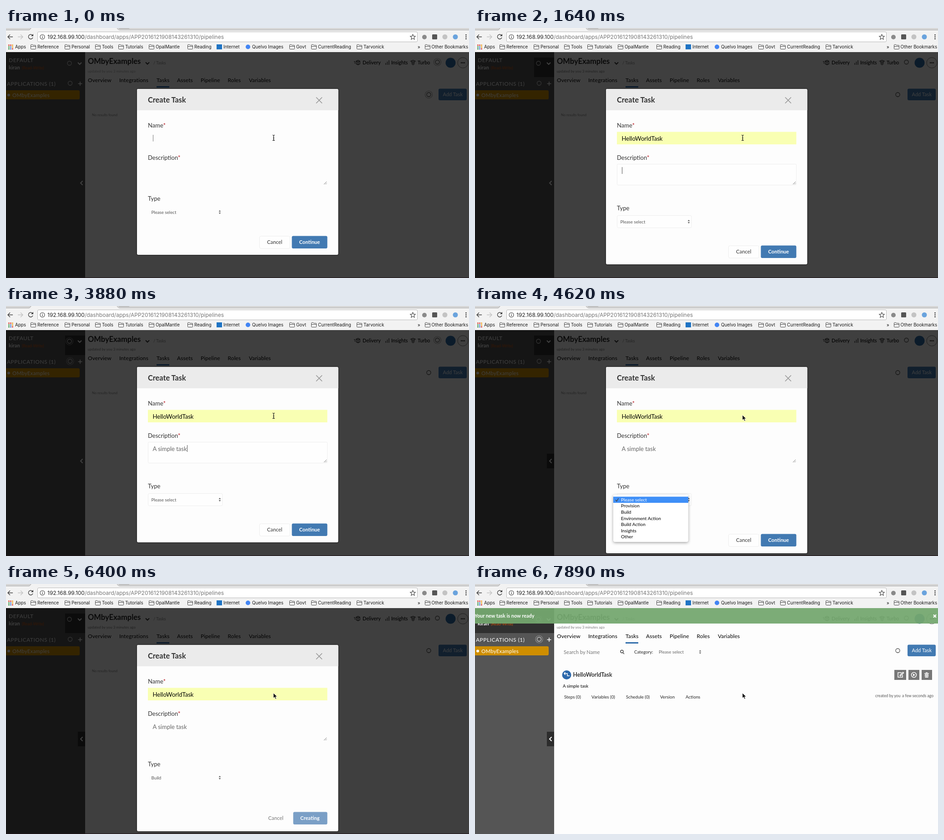
Write an HTML page that moves like this. It is 1018 px wide and 550 px high and loops after 8000 ms.

```html
<!DOCTYPE html>
<html lang="en">
<head>
<meta charset="utf-8">
<title>Create Task</title>
<style>
html, body { margin: 0; width: 100%; height: 100%; overflow: hidden; background: #fdfdfd; }
svg { display: block; width: 100%; height: 100%; }
text { font-family: Lato, "Open Sans", sans-serif; white-space: pre; }
.ui text { font-family: Inter, Roboto, sans-serif; font-size: 9.8px; fill: #1a1a1a; }
.ui .url { font-size: 12px; fill: #777; }
.line { fill: none; stroke: #444; stroke-width: 1.4; }
.b { font-weight: 700; }
.tabs text { font-size: 12px; letter-spacing: .1px; }
.nav text { font-size: 10.8px; font-weight: 500; }
.side text { fill: #fff; }
.side .caps { font-size: 12px; letter-spacing: .5px; }
.small text { font-size: 9.75px; fill: #222; }
.form text { font-size: 13px; fill: #333; }
.form .sel, .form .err { font-size: 9.75px; fill: #555; }
.form .err { fill: #a3141c; }
.form .btn { font-size: 11.3px; }
.form .go { font-size: 11.2px; font-weight: 700; fill: #fff; }
.form .star { fill: #b5121b; }
.box { fill: #fefefe; stroke: #eee; }
.popup text { font-size: 10.1px; fill: #000; }
.w { fill: none; stroke: #fff; stroke-width: 1.5; }
</style>
</head>
<body>
<svg viewBox="0 0 1018 550" preserveAspectRatio="none">
<defs>
  <g id="folder" fill="none" stroke="#4a4a4a"><path d="M.5 9.5v-8q0-1 1-1h3l1.500 1.500h4.500q1 0 1 1v6.500q0 1-1 1h-9q-1 0-1-1zM.5 4.500h11"/></g>
  <path id="updown" d="M-2.300-1h4.600L0-4.200zM-2.300 1h4.600L0 4.200z" fill="#666"/>
  <path id="chev" d="M-4-2L0 2L4-2" fill="none" stroke-width="2.2"/>
</defs>

<!-- page -->
<rect y="53" width="1018" height="497" fill="#fdfdfd"/>
<text x="180" y="79" class="b" font-size="16.5" fill="#222">OMbyExamples</text>
<use href="#chev" x="311" y="77.500" stroke="#333"/>
<text x="324" y="79.500" font-size="9.1" fill="#888">/ Tasks</text>
<text x="179.500" y="97.500" font-size="8" fill="#777" id="updated">updated by you 3 minutes ago</text>
<g class="tabs">
  <text x="180" y="119">Overview</text><text x="249" y="119">Integrations</text>
  <text x="331" y="119">Tasks</text><text x="376" y="119">Assets</text>
  <text x="428" y="119">Pipeline</text><text x="487.500" y="119">Roles</text>
  <text x="534" y="119">Variables</text>
  <rect x="331" y="128" width="28" height="3" fill="#2e6caa"/>
</g>
<g class="nav">
  <path class="line" d="M770 73l4-2l4 2v6l-4 2l-4-2zM770 73l4 2l4-2M774 75v6M765 74h3M766 77h2"/>
  <text x="784" y="80">Delivery</text>
  <path d="M835 81v-4M838.500 81v-7M842 81v-10" class="line" stroke-width="2"/>
  <text x="847" y="80">Insights</text>
  <path class="line" d="M890 73l5-2l5 2l-5 2zM891 76l4 2l4-2M892 79l3 2l3-2"/>
  <text x="905" y="80">Turbo</text>
  <circle cx="977.500" cy="76.500" r="11" fill="#2d6ba6"/>
  <circle cx="1004.500" cy="76.500" r="11.500" fill="none" stroke="#777"/>
  <path d="M1000 76.500h9" stroke="#333" stroke-width="2.400" stroke-dasharray="2.400 1"/>
</g>
<rect x="951" y="133.500" width="62" height="25.500" rx="3" fill="#427ab2"/>
<text x="960.500" y="150" font-size="11.1" fill="#fff">Add Task</text>
<g id="mainSpin"></g>
<text x="189" y="193.500" font-size="7.7" fill="#888" data-on="0 7890">No results found</text>

<g class="small" data-on="7890 8000">
  <text x="195" y="154" style="font-size:11.2px;fill:#777">Search by Name</text>
  <circle class="line" cx="323" cy="148.500" r="3"/><path class="line" d="M325 151l3 3"/>
  <text x="350" y="153">Category:</text>
  <text x="404" y="153" style="fill:#666">Please select</text>
  <use href="#updown" x="495" y="149.500"/>
  <circle cx="201.500" cy="200" r="10" fill="#2c68ab"/>
  <path class="w" stroke-width="2" d="M198.500 194l-2.500 3l2.500 3M196 197h7v5h5"/>
  <text x="215.500" y="203.700" class="b" style="font-size:12.25px;fill:#333">HelloWorldTask</text>
  <text x="193" y="228" style="fill:#000">A simple task</text>
  <text x="196" y="251.500">Steps (0)</text><text x="256" y="251.500">Variables (0)</text>
  <text x="332" y="251.500">Schedule (0)</text><text x="407" y="251.500">Version</text>
  <text x="463" y="251.500">Actions</text>
  <text x="880" y="249" style="font-size:8.65px;fill:#555">created by you</text>
  <text x="939" y="249" style="font-size:8.65px;fill:#555">a few seconds ago</text>
  <path d="M922 189h26v22h-26zM953 189h24v22h-24zM982 189h23v22h-23z" fill="#777"/>
  <path class="w" d="M938 195h-8v10h10v-5M934 201l7-7l1.500 1.500l-7 7z"/>
  <circle class="w" cx="965" cy="200" r="5.500"/><path d="M963 197l5 3l-5 3z" fill="#fff"/>
  <path d="M988 196h10v1.500h-10zM991 194.500h4v1.500h-4zM989 198.500h8l-.7 7.500h-6.600z" fill="#fff"/>
  <path d="M991.500 200v5M994.500 200v5" stroke="#777"/>
</g>

<!-- sidebar -->
<g class="side">
  <rect y="53" width="174" height="497" fill="#555"/>
  <rect y="53" width="174" height="55" fill="#303030" data-on="7890 8000"/>
  <rect x="130" y="65" width="44" height="43" fill="#303030" data-on="300 7890"/>
  <text x="6" y="75.300" class="caps">DEFAULT</text>
  <text x="6" y="91" class="b" font-size="11.1">kiran</text>
  <text x="35" y="90.500" font-size="8.8" style="fill:#d0570c">(Read-Write)</text>
  <use href="#chev" x="162" y="78" stroke="#fff"/>
  <text x="2" y="127.300" class="caps">APPLICATIONS (1)</text>
  <path class="w" stroke-width="2" d="M158.500 122.500h9M163 118v9"/>
  <path d="M0 137h159q3 0 3 3v14q0 3-3 3H0z" fill="#cf8e00"/>
  <circle cx="6" cy="147.500" r="3" fill="#fff"/>
  <text x="14" y="151.500" font-size="11.5" letter-spacing=".2">OMbyExamples</text>
  <rect x="158" y="325" width="16" height="32" fill="#2c2c2c" data-on="4320 8000"/>
  <path class="w" style="stroke-width:2" d="M168.500 336.500l-4.500 4.500l4.500 4.500"/>
  <g id="sideSpin"></g>
</g>

<g data-on="7890 8000">
  <rect y="53" width="1018" height="34" fill="#74a76f" opacity=".94"/>
  <text x="-1" y="74" class="b" font-size="10.9" fill="#fff">Your new task is now ready</text>
  <path d="M1008 67.500l6 6M1014 67.500l-6 6" stroke="#fff" stroke-width="2.200"/>
</g>

<!-- dialog -->
<g data-on="0 7890">
  <rect y="53" width="1018" height="497" opacity=".75"/>
  <rect y="548.500" width="1018" height="1.500" fill="#22141b" opacity=".7"/>
  <g class="form">
    <rect id="dialog" x="288" y="134" width="442.500" height="365" rx="3" fill="#fdfdfd" style="filter:drop-shadow(0 .5px 1.500px rgba(0,0,0,.8))"/>
    <path d="M288 181v-44q0-3 3-3h436.500q3 0 3 3v44z" fill="#ebebeb"/>
    <text x="312" y="164" class="b" style="font-size:16.3px">Create Task</text>
    <path d="M682 152.500l13 13M695 152.500l-13 13" stroke="#999" stroke-width="1.700"/>

    <text x="312" y="219">Name<tspan class="star">*</tspan></text>
    <rect x="312" y="228.500" width="394.500" height="27.500" fill="#f9ffb3" data-on="1040 8000"/>
    <rect x="332.500" y="236" width="81.500" height="14" fill="#abd0df" data-on="1040 1340"/>
    <text x="322.500" y="247.500" id="name" style="font-size:13.1px;fill:#000"></text>
    <path d="M323.500 235v14.500" stroke="#777" data-on="0 150"/>
    <path d="M333.500 236v14" stroke="#777" data-on="600 1040"/>

    <text x="312" y="290">Description<tspan class="star">*</tspan></text>
    <rect class="box" x="312.500" y="299.500" width="394" height="46" rx="2" data-on="1340 4320"/>
    <text x="322.500" y="318.500" id="desc" style="fill:#666"></text>
    <rect id="caret" y="306" width="1" height="15" fill="#555" data-on="1640 2090 2530 4320"/>
    <path d="M699 344l6-6M702.500 344l2.500-2.500" stroke="#777"/>

    <g data-on="600 1340">
      <rect id="hint" x="312.500" y="256.500" width="394" height="20" stroke="#95b4d8"/>
      <text x="319.500" y="271" style="font:bold 10.6px 'Liberation Sans',Arial,sans-serif;fill:#111">HelloWorldTask</text>
    </g>

    <g id="type">
      <text x="312" y="380">Type</text>
      <rect class="box" x="312.500" y="391.500" width="163.500" height="27" rx="3" data-on="1340 5960"/>
      <text x="319.500" y="408.500" class="sel" id="kind"></text>
      <use href="#updown" x="470" y="405"/>
    </g>
    <text x="312" y="455" class="err" data-on="4320 5960">Mandatory field missing</text>

    <g id="buttons">
      <rect class="box" x="557.500" y="458" width="67" height="27" rx="3" data-on="0 6400"/>
      <text x="574" y="475" class="btn" data-on="0 6400">Cancel</text>
      <text x="576.500" y="475" class="btn" style="fill:#777" data-on="6400 8000">Cancel</text>
      <g data-on="0 6400">
        <rect x="628.500" y="457.500" width="78" height="27.500" rx="3" fill="#427ab2"/>
        <text x="644.500" y="474.500" class="go">Continue</text>
      </g>
      <g data-on="6400 8000">
        <rect x="631.500" y="457.500" width="75" height="27.500" rx="3" fill="#7a9fc6"/>
        <text x="647" y="474.500" class="go">Creating</text>
      </g>
    </g>
  </g>

  <g class="popup" id="popup">
    <rect x="304" y="415" width="165" height="104" rx="4" fill="#fff" style="filter:drop-shadow(0 2px 3px rgba(0,0,0,.35))"/>
    <rect id="pick" x="304" width="165" height="13.500" fill="#3f8ff7"/>
    <path class="line" d="M309 426.500l2.500 3l4-6.500"/>
    <g id="options"></g>
  </g>
</g>

<path d="M586 235.500q2.500 0 2.500 2v8q0 2-2.500 2M591 235.500q-2.500 0-2.500 2v8q0 2 2.500 2M587 242h3" fill="none" stroke="#222" stroke-width="1.200" data-on="0 4620"/>
<path d="M588 240v11l2.600-2.400l1.900 4.400l1.900-.8l-1.900-4.300h3.600z" stroke="#fff" stroke-width=".7" data-on="4620 8000"/>

<!-- browser bar -->
<g class="ui">
  <rect width="1018" height="53" fill="#f2f2f2"/>
  <path d="M0 0h56l-4 4.500H0zM244 0h774v4.500H250z" fill="#d6d6d6"/>
  <path d="M0 4.500h50q3 0 5-4.500M244 0q2 4.500 6 4.500h768" fill="none" stroke="#a9a9a9"/>
  <path d="M247 0h23l2 2h-23z" fill="#bbb"/>
  <path class="line" d="M15 19.500H4.500M9 14.500l-5 5l5 5"/>
  <path class="line" style="stroke:#c4c4c4" d="M26 19.500h10.500M32 14.500l5 5l-5 5"/>
  <path class="line" d="M58.500 16.500a5 5 0 1 0 .5 4.500"/><path d="M60 13v5h-5z" fill="#444"/>
  <rect x="69.500" y="8.500" width="835" height="22" rx="2.500" fill="#fff" stroke="#b9b9b9"/>
  <circle class="line" style="stroke-width:1.100" cx="80" cy="19.500" r="5"/><path d="M80 18.500v4M80 16v1.300" stroke="#444" stroke-width="1.300"/>
  <text x="91" y="23.500" class="url"><tspan fill="#222">192.168.99.100</tspan>/dashboard/apps/APP2016121908143261310/pipelines</text>
  <path class="line" style="stroke-width:1.100" d="M894.500 14l1.600 3.900l4.100.3l-3.100 2.700l1 4.100l-3.600-2.200l-3.600 2.200l1-4.100l-3.100-2.700l4.100-.3z"/>
  <circle cx="920" cy="20" r="5" fill="#8a8a8a"/>
  <rect x="937" y="14" width="11" height="11" rx="1.500" fill="#555"/>
  <circle cx="965" cy="19.500" r="5.500" fill="#c3c3c3"/>
  <circle cx="988" cy="19.500" r="5.500" fill="#6aa3dd"/>
  <path d="M1011.500 14v2.400M1011.500 18.300v2.400M1011.500 22.600v2.400" stroke="#444" stroke-width="2.400"/>
  <g id="marks"></g>
  <rect x="463" y="36" width="12" height="11" fill="#1f74c4"/>
  <circle cx="532" cy="41.500" r="5" fill="#4285f4"/>
  <text x="905" y="45">»</text>
</g>
</svg>
<script>
const NS = "http://www.w3.org/2000/svg", LOOP = 8000;
const $ = id => document.getElementById(id);

function add(parent, tag, attrs, text) {
  const el = document.createElementNS(NS, tag);
  for (const key in attrs) el.setAttribute(key, attrs[key]);
  if (text) el.textContent = text;
  return parent.appendChild(el);
}

// bookmarks: label, text x, folder or not
[["Apps", 20], ["Reference", 69, 1], ["Personal", 144, 1], ["Tools", 211, 1],
 ["Tutorials", 262, 1], ["OpalMantle", 329, 1], ["Reading", 414, 1], ["Internet", 478],
 ["Quelvo Images", 541], ["Govt", 638, 1], ["CurrentReading", 686, 1],
 ["Tarvonick", 786, 1], ["Other Bookmarks", 935.5, 1]].forEach(([label, x, folder]) => {
  add($("marks"), "text", { x, y: 45 }, label);
  if (folder) add($("marks"), "use", { href: "#folder", x: Math.round(x) - 15, y: 36 });
});
const dots = ["#e0443a", "#e0443a", "#f0a828", "#3a9b52", "#4a84d8", "#f0a828", "#3a9b52", "#4a84d8", "#e0443a"];
dots.forEach((fill, i) => add($("marks"), "rect",
  { x: 5 + i % 3 * 4, y: 36.5 + Math.floor(i / 3) * 4, width: 2.7, height: 2.7, fill }));

["Please select", "Provision", "Build", "Environment Action", "Build Action", "Insights", "Other"]
  .forEach((label, i) => add($("options"), "text", { x: 321, y: 429.7 + i * 13.6 }, label));

// status rings: a small ring, with a wide one around it at times
function ring(parent, cx, cy, stroke, on) {
  const look = { cx, cy, fill: "none", stroke };
  add(parent, "circle", { ...look, r: 4.5, "stroke-width": 1.3 });
  add(parent, "circle", { ...look, r: 8, "stroke-width": 1.2, opacity: .5, "data-on": on });
}
ring($("sideSpin"), 139.5, 77.5, "#ccc", "3130 4320 7740 8000");
ring($("sideSpin"), 141, 121.5, "#ccc", "3130 4320 7740 8000");
ring($("mainSpin"), 948.5, 75, "#555", "0 150 3130 4320 7740 7890");
ring($("mainSpin"), 929.5, 146.5, "#555", "0 300 5510 5960");

const timed = [...document.querySelectorAll("[data-on]")].map(el => ({
  el, spans: el.dataset.on.split(" ").map(Number)
}));
const inside = (spans, t) => spans.filter(edge => edge <= t).length % 2 === 1;

// last value whose time has come
const at = (steps, t) => steps.reduce((value, [start, next]) => t >= start ? next : value, steps[0][1]);

const typed = [[0, 0], [2530, 1], [2680, 2], [2830, 4], [2980, 5], [3130, 6], [3280, 8],
  [3430, 9], [3580, 10], [3730, 11], [3880, 13]];

function draw(t) {
  for (const { el, spans } of timed) el.style.display = inside(spans, t) ? "" : "none";
  $("updated").style.opacity = t < 150 ? .65 : 1;
  $("name").textContent = at([[0, ""], [600, "H"], [1040, "HelloWorldTask"]], t);
  $("hint").setAttribute("fill", t < 1040 ? "#fff" : "#b0d3ff");

  $("desc").textContent = "A simple task".slice(0, at(typed, t));
  $("caret").setAttribute("x", 323 + $("desc").getComputedTextLength());

  $("dialog").setAttribute("height", at([[0, 365], [1340, 386], [4320, 410]], t));
  $("type").setAttribute("transform", `translate(0 ${t < 1340 ? 0 : 21})`);
  $("buttons").setAttribute("transform", `translate(0 ${at([[0, 0], [1340, 21], [4320, 44]], t)})`);
  $("kind").textContent = t < 5810 ? "Please select" : "Build";

  $("popup").style.opacity = at([[0, 0], [4620, 1], [5510, .6], [5660, .2], [5810, 0]], t);
  $("pick").setAttribute("y", at([[0, 419.5], [4770, 433], [5210, 446.5]], t));
  const chosen = at([[0, 0], [4770, 1], [5210, 2]], t);
  [...$("options").children].forEach((el, i) => el.style.fill = i === chosen ? "#fff" : "#000");
}

const begin = performance.now();
function tick() {
  draw((performance.now() - begin) % LOOP);
  requestAnimationFrame(tick);
}
tick();
</script>
</body>
</html>
```
